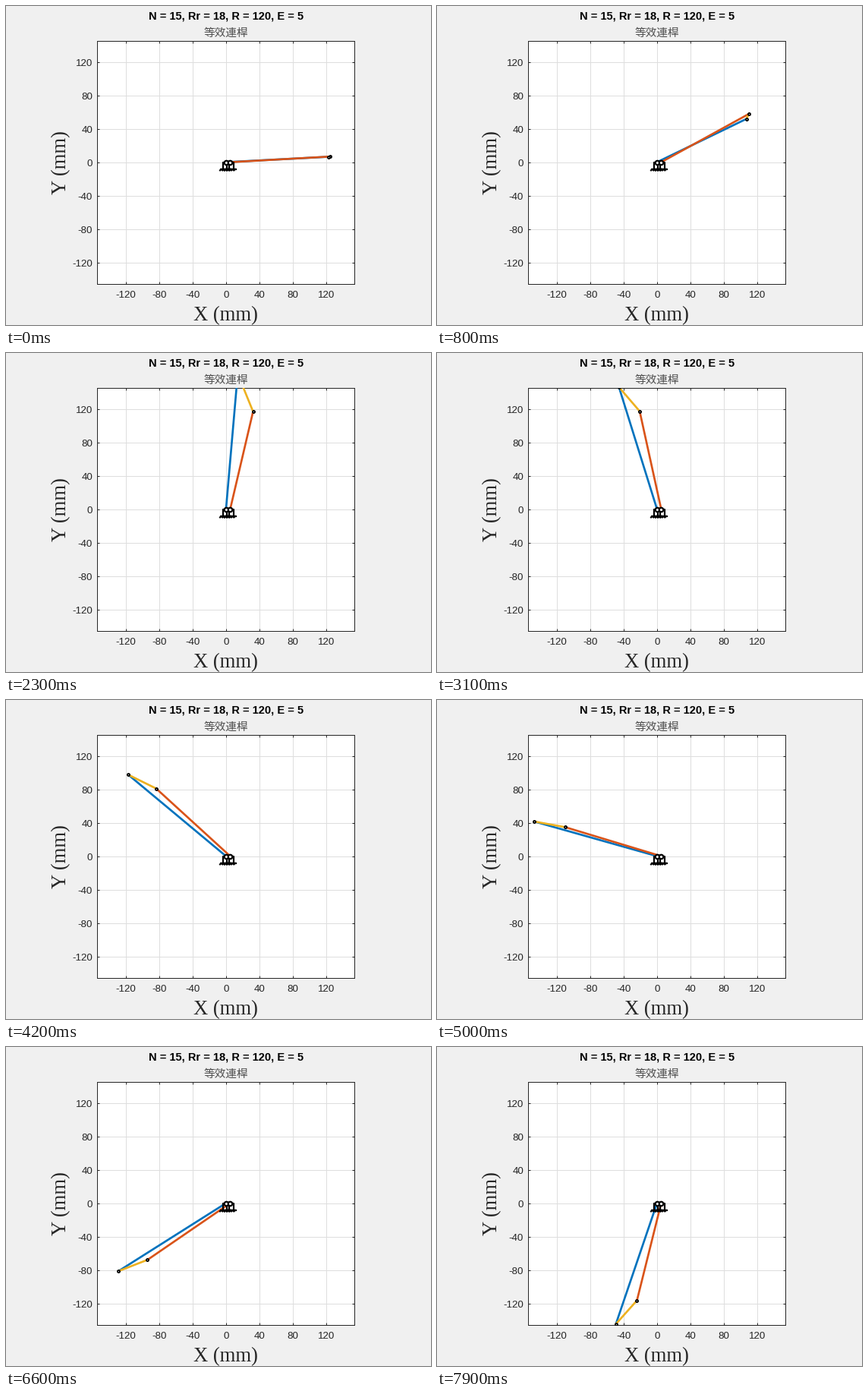
Recreate the animation shown at these times as a matplotlib script. Size 560x420 px, loop 8 s.

```python
import numpy as np
import matplotlib.pyplot as plt
from matplotlib.animation import FuncAnimation

W, H, DPI = 560, 420, 100
N, RR, R, E = 15, 18, 120, 5
FRAMES, INTERVAL, STEP = 80, 100, 3.2
BLUE, ORANGE, YELLOW = "#0072bd", "#d95319", "#edb120"
INK = "#262626"
SCALE = 1.1  # pixels per millimetre


def px(n):
    """Pixels to points."""
    return n * 72 / DPI


def label(x, y, text, size, family="Liberation Sans", color=INK, **kw):
    kw = {"ha": "center", "va": "baseline", **kw}
    fig.text(x / W, 1 - y / H, text, fontsize=px(size), family=family,
             color=color, **kw)


fig = plt.figure(figsize=(W / DPI, H / DPI), dpi=DPI, facecolor="#f0f0f0")
# Edges sit just off the half pixel so that lines snap to the right row
left, right, top, bottom = 120.4, 459.4, 45.6, 365.6
ax = fig.add_axes([left / W, 1 - bottom / H, (right - left) / W, (bottom - top) / H])
half_w, half_h = (right - left) / 2 / SCALE, (bottom - top) / 2 / SCALE
ax.set_xlim(-half_w, half_w)
ax.set_ylim(-half_h, half_h)
ticks = np.arange(-120, 121, 40)
ax.set_xticks(ticks)
ax.set_yticks(ticks)
ax.set_axisbelow(True)
ax.grid(color="#dedede", lw=px(1))
ax.tick_params(direction="in", length=px(3.4), width=px(1), color=INK,
               top=True, right=True, labelbottom=False, labelleft=False)
for spine in ax.spines.values():
    spine.set(color=INK, linewidth=px(1))

for t in ticks:
    label(290 + t * SCALE, 384, str(t), 13.33)
    label(114, 211.3 - t * SCALE, str(t), 13.33, ha="right")
label(290, 18, f"N = {N}, Rr = {RR}, R = {R}, E = {E}", 14.67,
      color="black", weight="bold")
label(290, 40, "等效連桿", 14.67, "Noto Sans CJK JP", "#505050")
label(289.5, 414, "X (mm)", 26.67, "Liberation Serif")
label(85, 206, "Y (mm)", 26.67, "Liberation Serif", rotation=90,
      ha="right", va="center")


def link(color):
    return ax.plot([], [], color=color, lw=px(2.67), zorder=3)[0]


def support(x):
    """Ground bearing with a hatched base."""
    style = dict(color="black", lw=px(2.2), zorder=5)
    ax.plot([x - 4, x - 4, x + 4, x + 4], [-8.5, 0, 0, -8.5], **style)
    ax.plot([x - 6.5, x + 6.5], [-8.5, -8.5], **style)
    for dx in np.linspace(-5.5, 6, 5):
        ax.plot([x + dx, x + dx - 1.6], [-8.5, -9.8], **style)
    ax.plot(x, 0, "o", ms=px(5.5), mfc="white", mec="black", mew=px(2.2),
            zorder=6)


blue, orange, yellow = map(link, (BLUE, ORANGE, YELLOW))
pins, = ax.plot([], [], "o", ms=px(3), mfc="white", mec="black",
                mew=px(1.9), zorder=4)
support(0)
support(E)


def put(line, *points):
    z = np.array(points)
    line.set_data(z.real, z.imag)


def draw(i):
    # Pin centre, and curvature centre of its path seen from the disc
    arm = R * np.exp(1j * np.radians(STEP * (i + 1)))
    pin = E + arm
    normal = arm - E * N
    bend = (np.conj(normal) * (arm + E * N * N)).real
    joint = pin - normal * abs(normal) ** 2 / bend
    put(blue, 0j, joint)
    put(orange, E + 0j, pin)
    put(yellow, pin, joint)
    put(pins, pin, joint)
    return blue, orange, yellow, pins


anim = FuncAnimation(fig, draw, frames=FRAMES, interval=INTERVAL,
                     repeat=True, repeat_delay=0)
plt.show()
```
